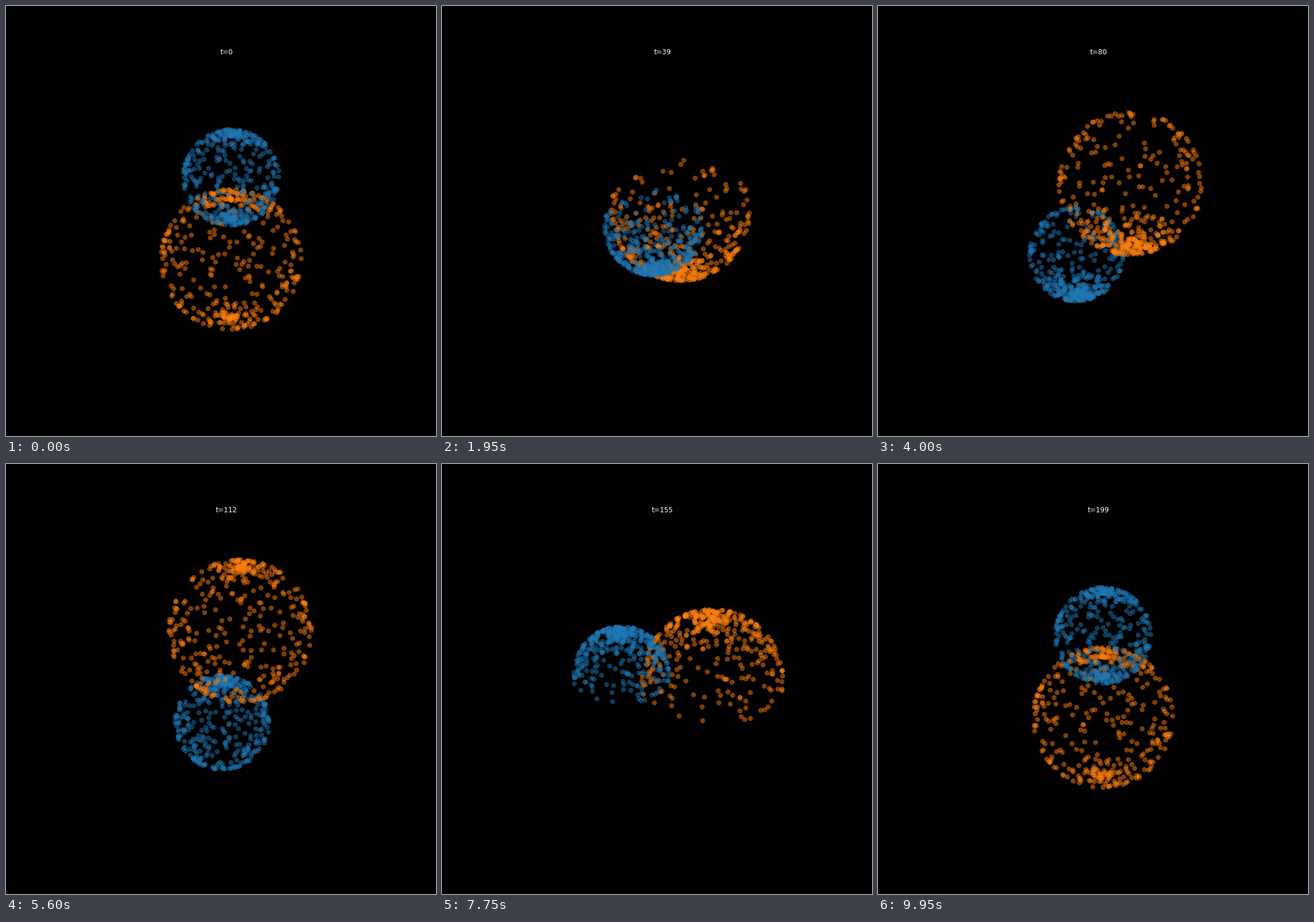
Animation of 748x748 px, one loop 10000 ms. Source, as a matplotlib script:

```python
import numpy as np
import matplotlib.pyplot as plt
from matplotlib.animation import FuncAnimation

SIZE, DPI = 748, 72
FRAMES, INTERVAL = 200, 50
POINTS = 400

# Camera: 30 degrees up, turned by -60 degrees, mild perspective
ELEV, AZIM = np.radians(30), np.radians(-60)
DIST = 10
UNIT = 0.26408
ZOOM = 576 / 0.185
ORIGIN_X, ORIGIN_Y = 391.13, 369.96

rng = np.random.RandomState(0)
theta = rng.uniform(0, 2 * np.pi, POINTS)
phi = rng.uniform(0, np.pi, POINTS)
orbit = np.linspace(0, 2 * np.pi, FRAMES)


def spherical(polar, azimuth):
    return np.array([np.sin(polar) * np.cos(azimuth),
                     np.sin(polar) * np.sin(azimuth),
                     np.cos(polar)])


def project(p):
    """Return pixel positions and the depth towards the viewer."""
    x, y, z = p * UNIT
    right = -x * np.sin(AZIM) + y * np.cos(AZIM)
    near = x * np.cos(AZIM) + y * np.sin(AZIM)
    up = z * np.cos(ELEV) - near * np.sin(ELEV)
    depth = z * np.sin(ELEV) + near * np.cos(ELEV)
    scale = ZOOM / (DIST - depth)
    return np.column_stack([ORIGIN_X + right * scale,
                            ORIGIN_Y - up * scale]), depth


fig = plt.figure(figsize=(SIZE / DPI, SIZE / DPI), dpi=DPI, facecolor="black")
ax = fig.add_axes([0, 0, 1, 1])
ax.set_xlim(0, SIZE)
ax.set_ylim(SIZE, 0)
ax.axis("off")

# (radius, side of the orbit, dots)
balls = [(radius, side, ax.scatter(np.zeros(POINTS), np.zeros(POINTS), s=76,
                                   color=color, alpha=0.5, linewidths=0))
         for radius, side, color in [(1, 1, "tab:blue"),
                                     (1.5, -1, "tab:orange")]]
title = fig.text(0.5125, 1 - 83.76 / SIZE, "", color="white", fontsize=12,
                 family="DejaVu Sans", ha="center", va="baseline")


def update(t):
    turn = 2 * np.pi * t / FRAMES
    shell = spherical(phi + turn, theta + turn)
    center = spherical(orbit[t], 4 * orbit[t])[:, None]
    for radius, side, dots in balls:
        xy, depth = project(radius * shell + side * center)
        dots.set_offsets(xy)
        dots.set_zorder(10 + depth.max())
    title.set_text(f"t={t}")
    return [dots for _, _, dots in balls] + [title]


anim = FuncAnimation(fig, update, frames=FRAMES, interval=INTERVAL,
                     repeat=True, repeat_delay=0, blit=False)
plt.show()
```
